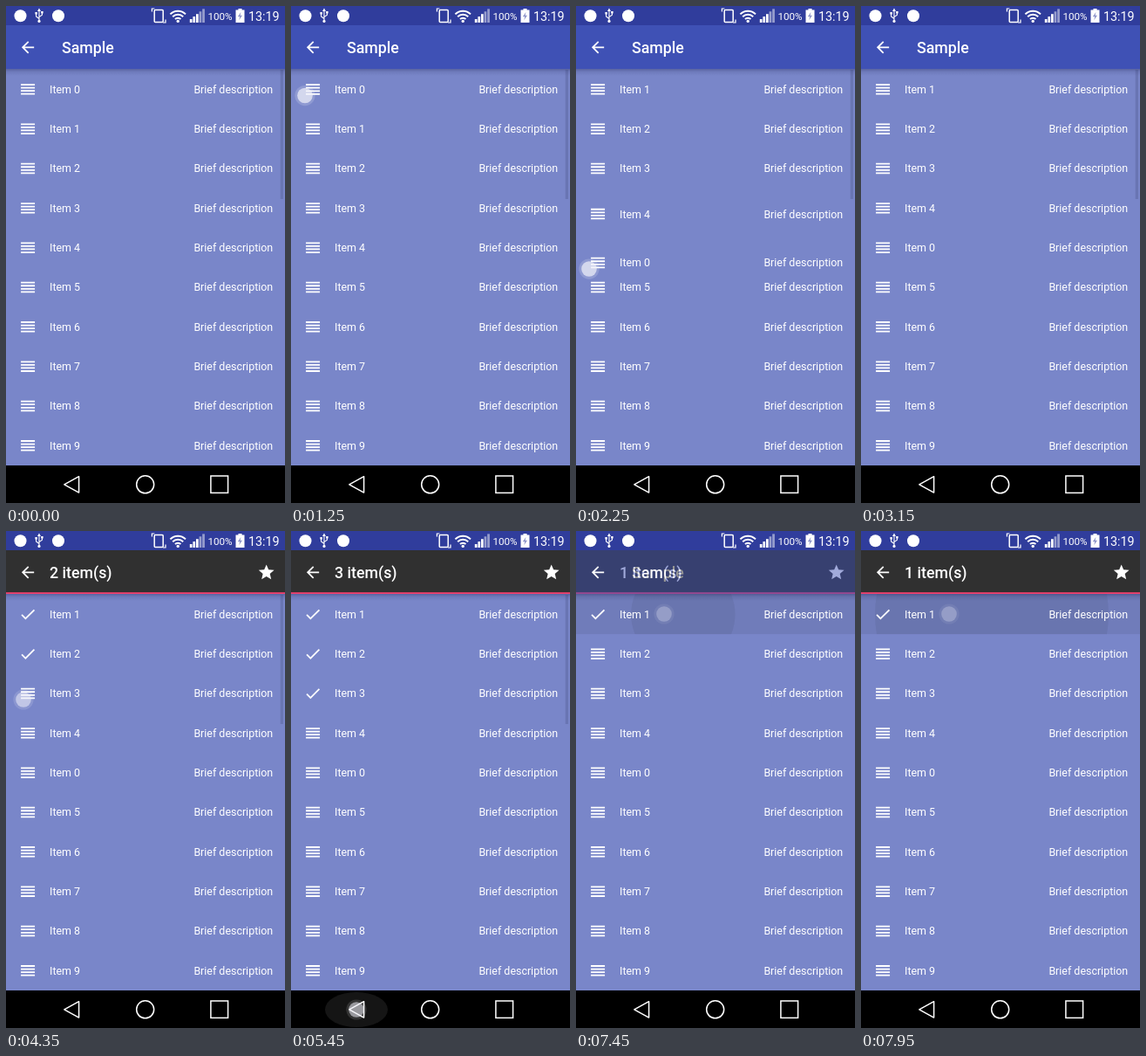
Recreate the animation shown at these times as an HTML page. Size 320x569 px, loop 8000 ms.

```html
<!DOCTYPE html>
<html lang="en">
<head>
<meta charset="utf-8">
<title>Sample</title>
<style>
html, body { margin: 0; width: 100%; height: 100%; overflow: hidden; background: #000; }
svg { display: block; width: 100vw; height: 100vh; font-family: Roboto, sans-serif; fill: #fff; }
.row text { font-size: 12.44px; }
.title { font-size: 17.78px; font-weight: 500; }
.line { fill: none; stroke: #fff; }
</style>
</head>
<body>
<svg viewBox="0 0 320 569" xmlns="http://www.w3.org/2000/svg">
  <defs>
    <linearGradient id="shade" x2="0" y2="1">
      <stop offset="0" stop-color="#1c2050" stop-opacity=".34"/>
      <stop offset=".4" stop-color="#1c2050" stop-opacity=".12"/>
      <stop offset="1" stop-color="#1c2050" stop-opacity="0"/>
    </linearGradient>
    <clipPath id="firstRow"><rect y="72" width="320" height="46.2"/></clipPath>
    <path id="bars" d="M3 15h18v-2H3zm0 4h18v-2H3zm0-8h18V9H3zm0-6v2h18V5z"/>
    <path id="check" d="M9 16.17 4.83 12l-1.42 1.41L9 19 21 7l-1.41-1.41z"/>
    <path id="arrow" d="M20 11H7.83l5.59-5.59L12 4l-8 8 8 8 1.41-1.41L7.83 13H20z"/>
    <path id="star" d="M12 17.27 18.18 21l-1.64-7.03L22 9.24l-7.19-.61L12 2 9.19 8.63 2 9.24l5.46 4.73L5.82 21z"/>
  </defs>

  <rect width="320" height="569" fill="#7986c9"/>
  <g clip-path="url(#firstRow)" fill="#000">
    <rect id="pressed" y="72" width="320" height="46.2"/>
    <circle id="ripple" cy="95.4" fill-opacity=".06"/>
  </g>
  <g id="list"></g>
  <rect id="scroll" x="314.7" y="73" width="3.3" height="148" fill="#39406f" fill-opacity=".25"/>
  <rect y="72" width="320" height="8" fill="url(#shade)"/>

  <rect y="22" width="320" height="50" fill="#3f51b5"/>
  <text class="title" x="64" y="53.8">Sample</text>
  <g id="actions">
    <rect y="22" width="320" height="50" fill="#303030"/>
    <rect y="70.2" width="320" height="1.8" fill="#f0406f"/>
    <text id="count" class="title" x="50" y="53.8"></text>
    <use href="#star" transform="translate(288 36.6) scale(.889)"/>
  </g>
  <use href="#arrow" transform="translate(14.4 36.6) scale(.889)"/>

  <rect width="320" height="22" fill="#303d9c"/>
  <circle cx="16.5" cy="11.3" r="7"/>
  <path class="line" stroke-width="1.1" d="M38 5v12M38 14.5l-3.4-2.6V8.5M38 12.6l3.4-2.4V7.5"/>
  <path d="M38 2.6 40 6h-4zM33.4 7h2.4v2.4h-2.4zM40.2 6h2.4v2.4h-2.4z"/>
  <circle cx="38" cy="17.4" r="1.6"/>
  <circle cx="60" cy="11.3" r="7"/>
  <rect class="line" x="170.2" y="4.4" width="10" height="14" rx="1" stroke-width="1.5"/>
  <path class="line" stroke-width="1.2" d="M167.4 6.5V3h3M183 15.5V19h-3"/>
  <path class="line" stroke-width="2" d="M188.4 9.4a12.4 12.4 0 0 1 17.6 0M191.2 12.3a8.4 8.4 0 0 1 12 0M194 15a4.5 4.5 0 0 1 6.4 0"/>
  <circle cx="197.2" cy="17.4" r="1.7"/>
  <g id="signal"></g>
  <text x="231.4" y="15.7" font-size="11.7">100%</text>
  <path d="M266.5 3h4v1.6h3V19h-10V4.6h3z"/>
  <path d="M269.4 7l-3.6 5.2h2.4l-1 4 3.8-5.4h-2.4z" fill="#303d9c" opacity=".55"/>
  <text x="278" y="16.6" font-size="14.3">13:19</text>

  <rect y="526" width="320" height="43" fill="#000"/>
  <ellipse id="navGlow" cx="75" cy="548" rx="36" ry="20"/>
  <g class="line" stroke-width="1.5">
    <path d="M83.6 538.7v18.4L66.8 547.9z" stroke-linejoin="round"/>
    <circle cx="159.7" cy="547.8" r="10"/>
    <rect x="234.9" y="538" width="19.7" height="19.4"/>
  </g>

  <g id="touch">
    <circle r="11.6" fill-opacity=".22"/>
    <circle r="8.8" fill="#f2f2fa"/>
  </g>
</svg>
<script>
const LOOP = 8000, TOP = 95.4, STEP = 45.33;
const $ = id => document.getElementById(id);
const clamp = x => Math.min(1, Math.max(0, x));
const part = (t, from, length) => clamp((t - from) / length);
const ease = x => 0.5 - Math.cos(Math.PI * x) / 2;
const rowY = i => TOP + STEP * i;

// Smooth curve through [time, value] points.
function curve(points, t) {
  const last = points.length - 1;
  if (t <= points[0][0]) return points[0][1];
  if (t >= points[last][0]) return points[last][1];
  const i = points.findIndex(p => p[0] > t) - 1;
  const slope = k => {
    const a = points[Math.max(0, k - 1)], b = points[Math.min(last, k + 1)];
    return (b[1] - a[1]) / (b[0] - a[0]);
  };
  const [t0, a] = points[i], [t1, b] = points[i + 1];
  const d = t1 - t0, u = (t - t0) / d, v = 1 - u;
  return v * v * (1 + 2 * u) * a + u * u * (3 - 2 * u) * b
    + u * v * d * (v * slope(i) - u * slope(i + 1));
}

const DROP = 2430;
const dragPath = [[1250, TOP], [1350, 110], [1460, 141], [1560, 168], [1650, 202],
  [1740, 219], [1850, 235], [2060, 277], [2250, 294], [DROP, 296]];
const grip = [[1250, 7], [1650, 12], [2250, 7]];
const swaps = [1465, 1630, 1835, 2064];

// Selection times per item: [from, to].
const picks = { 1: [[3350, 5530], [7350, LOOP]], 2: [[3950, 5530]], 3: [[4500, 5530]] };
const modes = [[3350, 5550], [7350, LOOP + 500]];

// from, to, x, y, opacity
const taps = [
  [3250, 3370, 20, 101, .6], [3800, 3970, 20, 147, .6], [4350, 4520, 20, 193, .6],
  [5400, 5520, 75, 548, .6], [6850, LOOP, 101, 95, .32]
];

const rows = Array.from({ length: 10 }, (_, i) => {
  const g = document.createElementNS('http://www.w3.org/2000/svg', 'g');
  g.setAttribute('class', 'row');
  g.innerHTML = `<use transform="translate(14.4 -10.7) scale(.889)"/>
    <text x="50" y="4.4">Item ${i}</text>
    <text x="306.2" y="4.4" text-anchor="end">Brief description</text>`;
  return { g, icon: g.firstChild };
});
rows.slice(1).concat(rows[0]).forEach(r => $('list').append(r.g));

$('signal').innerHTML = [0, 1, 2, 3, 4].map(i => {
  const h = 4 + i * 2.9;
  return `<rect x="${210.8 + i * 3.6}" y="${19 - h}" width="2.7" height="${h}" opacity="${i < 3 ? 1 : .5}"/>`;
}).join('');

const dragY = t => {
  const y = curve(dragPath, t);
  return y + (rowY(4) - y) * ease(part(t, DROP, 250));
};
const itemY = (i, t) => {
  if (i === 0) return dragY(t);
  return rowY(i) - (i <= swaps.length ? STEP * ease(part(t, swaps[i - 1], 250)) : 0);
};
const isPicked = (i, t) => (picks[i] || []).some(([a, b]) => t >= a && t < b);

function fingerAt(t) {
  if (t >= 1200 && t < DROP) return [16 - part(t, 1650, 600), dragY(t) + curve(grip, t), .75];
  const tap = taps.find(([a, b]) => t >= a && t < b);
  return tap ? tap.slice(2) : [0, 0, 0];
}

function draw(t) {
  let picked = 0;
  rows.forEach(({ g, icon }, i) => {
    const on = isPicked(i, t);
    picked += on;
    icon.setAttribute('href', on ? '#check' : '#bars');
    g.setAttribute('transform', `translate(0 ${itemY(i, t)})`);
  });

  const mode = Math.max(...modes.map(([a, b]) => ease(part(t, a, 200)) * (1 - ease(part(t, b, 200)))));
  $('actions').setAttribute('opacity', mode);
  $('count').textContent = `${picked || 3} item(s)`;
  $('scroll').setAttribute('opacity', 1 - part(t, 5500, 300));

  const grow = part(t, 7050, 900);
  $('pressed').setAttribute('opacity', .075 * part(t, 7050, 300));
  $('ripple').setAttribute('cx', 101 + 49 * grow);
  $('ripple').setAttribute('r', 134 * grow);
  $('navGlow').setAttribute('opacity', .16 * part(t, 5400, 100) * (1 - part(t, 5550, 280)));

  const [x, y, alpha] = fingerAt(t);
  $('touch').setAttribute('transform', `translate(${x} ${y})`);
  $('touch').setAttribute('opacity', alpha);
}

const start = performance.now();
function tick() {
  draw((performance.now() - start) % LOOP);
  requestAnimationFrame(tick);
}
tick();
</script>
</body>
</html>
```
